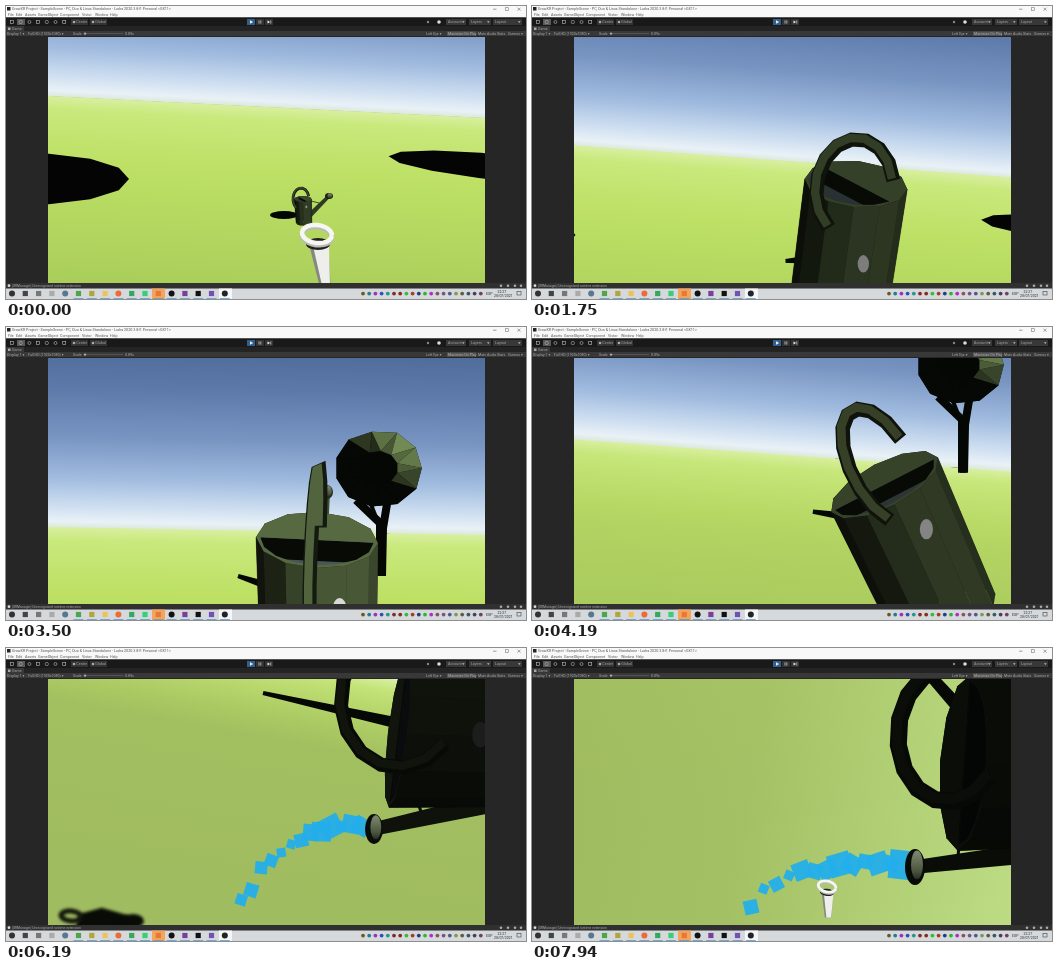
These frames come from a looping animation (520 by 293 pixels, 8 s). An HTML page with a canvas:

```html
<!DOCTYPE html>
<html lang="en">
<head>
<meta charset="utf-8">
<title>Watering can</title>
<style>
html, body { margin: 0; width: 100%; height: 100%; overflow: hidden; background: #262627; }
svg, canvas { position: absolute; left: 0; top: 0; }
canvas { left: 42px; top: 31px; }
text { font-family: Roboto, Arial, sans-serif; }
</style>
</head>
<body>
<svg id="ui" width="520" height="293"></svg>
<canvas id="view" width="437" height="246"></canvas>
<script>
const ui = document.getElementById('ui');
const g = document.getElementById('view').getContext('2d');
const LOOP = 8000, STEP = 62.5, TAU = Math.PI * 2;
const rand = n => { const s = Math.sin(n * 127.1 + 3.7) * 43758.5453; return s - Math.floor(s); };

// ---- editor window ----
function add(tag, attrs, text) {
  const e = document.createElementNS('http://www.w3.org/2000/svg', tag);
  for (const k in attrs) e.setAttribute(k, attrs[k]);
  if (text) e.textContent = text;
  ui.append(e);
}
const rect = (x, y, width, height, fill) => add('rect', { x, y, width, height, fill });
const box = (x, y, width, height, stroke, rx = 0) =>
  add('rect', { x, y, width, height, rx, stroke, fill: 'none', 'stroke-width': .6 });
const dot = (cx, cy, r, fill) => add('circle', { cx, cy, r, fill });
const line = (d, stroke) => add('path', { d, stroke, fill: 'none', 'stroke-width': .7 });
const label = (x, y, text, fill = '#a8a8a8', size = 3.7) =>
  add('text', { x, y, fill, 'font-size': size }, text);

rect(0, 0, 520, 11.5, '#f8f8f8');
rect(0, 11.5, 520, 8.5, '#191919');
rect(0, 20, 520, 5, '#242424');
rect(0, 25, 520, 5, '#383838');
rect(0, 30, 520, 247, '#262627');
rect(0, 277, 520, 5.5, '#303030');
rect(0, 282.5, 520, 10.5, '#d5d9dc');

rect(1, 1, 3.5, 3.5, '#222');
label(6, 4.4, 'GrowXR Project - SampleScene - PC, Duo & Linux Standalone - Ludra 2020.3.8f1 Personal <GX11>', '#555');
[['File', 2], ['Edit', 10], ['Assets', 19], ['GameObject', 32], ['Component', 54], ['Vistor', 76], ['Window', 89], ['Help', 104]]
  .forEach(([s, x]) => label(x, 10.2, s, '#555'));
line('M487 3.2h3.5M511.5 1.7l3 3m0-3l-3 3', '#777');
box(499.5, 1.7, 2.8, 2.8, '#777');

rect(11, 13, 8, 6, '#595959');
for (let i = 0; i < 7; i++) box(4.5 + i * 8.7, 14.5, 3, 3, '#bbb', i % 3);
[['Center', 65], ['Global', 84]].forEach(([s, x]) => {
  rect(x, 13, 17, 6, '#333');
  dot(x + 3, 16, 1.3, '#aaa');
  label(x + 5.3, 17.3, s);
});
[241, 250, 259].forEach((x, i) => rect(x, 13, 8, 6, i ? '#333' : '#31608f'));
add('path', { d: 'M244 14.2l3.2 1.8-3.2 1.8zM261.5 14.4l2.6 1.6-2.6 1.6z', fill: '#eee' });
line('M253 14.4v3.2m1.8-3.2v3.2M264.8 14.4v3.2', '#ddd');
dot(422, 16, 1.2, '#888');
dot(433, 16, 1.8, '#ddd');
[['Account', 440, 20], ['Layers', 463, 22], ['Layout', 487, 29]].forEach(([s, x, w]) => {
  rect(x, 13, w, 6, '#383838');
  label(x + 2, 17.3, s);
  add('path', { d: `M${x + w - 4} 15.3h2.6l-1.3 1.6z`, fill: '#bbb' });
});
rect(0, 20, 18, 5, '#383838');
rect(2, 21.5, 2.5, 2.5, '#aaa');
label(6, 24, 'Game');
rect(78, 27.3, 39, .6, '#666');
dot(79, 27.6, 1.2, '#aaa');
rect(441, 25.5, 29, 4.2, '#555');
[['Display 1  ▾', 1], ['Full HD (1920x1080)  ▾', 22], ['Scale', 67], ['0.89x', 119], ['Left Eye  ▾', 420],
  ['Maximize On Play', 442], ['Mute Audio', 472], ['Stats', 491], ['Gizmos ▾', 502]].forEach(([s, x]) => label(x, 29, s, '#aaa', 3.6));
dot(3, 279.7, 1.4, '#ddd');
label(6, 281, '[XRManager] Unrecognized runtime extension', '#aaa', 3.4);
[495, 502, 509, 515].forEach(x => dot(x, 279.7, 1.3, '#aaa'));

// ---- taskbar ----
rect(146, 282.5, 13, 10.5, '#f4a45c');
rect(213, 282.5, 13, 10.5, '#f4f6f7');
'#333 #444 #777 #aaa #587891 #4fa64a #b2a63a #eac35b #ee6a36 #35a85d #38cf78 #e87935 #111 #79409a #111 #7450b4 #20242a'
  .split(' ').forEach((c, i) => {
    const x = 6 + i * 13.3;
    if (i > 4) rect(x - 5, 292.2, 10, .8, '#5a9bd0');
    if (i % 4) rect(x - 2.6, 284.9, 5.2, 5.2, c); else dot(x, 287.5, 3, c);
  });
for (let i = 0; i < 20; i++)
  dot(357 + i * 6.2, 287.6, 1.9, `hsl(${360 * rand(i)} ${i < 12 ? 60 : 25}% ${25 + 25 * rand(i + 50)}%)`);
label(480, 289, 'ESP', '#333');
label(491.5, 286.8, '22:27', '#333', 3.5);
label(488, 291.4, '28/07/2021', '#333', 3.5);
box(511, 285.5, 4, 3.5, '#444');

// ---- drawing helpers ----
// Each key is [time, ...values]; values ease from one key to the next.
function at(t, ...keys) {
  let i = keys.findIndex(k => k[0] > t);
  if (i < 0) return keys[keys.length - 1].slice(1);
  if (!i) return keys[0].slice(1);
  const a = keys[i - 1], b = keys[i];
  let u = (t - a[0]) / (b[0] - a[0]);
  u = u * u * (3 - 2 * u);
  return a.slice(1).map((v, j) => v + (b[j + 1] - v) * u);
}
const olive = k => `rgb(${6 + 94 * k},${8 + 113 * k},${5 + 69 * k})`;
const lerp = (a, b, u) => a + (b - a) * u;

function trace(pts) { g.beginPath(); pts.forEach(p => g.lineTo(...p)); }
function fill(pts, color) { trace(pts); g.fillStyle = color; g.fill(); }
function stroke(pts, color, width) { trace(pts); g.strokeStyle = color; g.lineWidth = width; g.stroke(); }
function oval(x, y, rx, ry, color, turn = 0) {
  g.beginPath();
  g.ellipse(x, y, rx, ry, turn, 0, TAU);
  g.fillStyle = color;
  g.fill();
}
function tube([x0, y0], [x1, y1], w0, w1, color) {
  const len = Math.hypot(x1 - x0, y1 - y0) || 1;
  const nx = (y0 - y1) / len / 2, ny = (x1 - x0) / len / 2;
  fill([[x0 + nx * w0, y0 + ny * w0], [x1 + nx * w1, y1 + ny * w1],
    [x1 - nx * w1, y1 - ny * w1], [x0 - nx * w0, y0 - ny * w0]], color);
}
function onOval([x, y, rx, ry, turn = 0], a) {
  const u = Math.cos(a) * rx, v = Math.sin(a) * ry, c = Math.cos(turn), s = Math.sin(turn);
  return [x + u * c - v * s, y + u * s + v * c];
}
const arc = (shape, from, to, n) =>
  Array.from({ length: n + 1 }, (_, i) => onOval(shape, lerp(from, to, i / n)));
function at2d([dx, dy, scale = 1, turn = 0], paint) {
  g.save();
  g.translate(dx, dy);
  g.rotate(turn);
  g.scale(scale, scale);
  paint();
  g.restore();
}
function ramp(x0, y0, x1, y1, stops) {
  const r = g.createLinearGradient(x0, y0, x1, y1);
  stops.forEach(([o, c]) => r.addColorStop(o, c));
  return r;
}

// ---- landscape ----
const sky = ramp(0, -200, 0, 0, [[0, '#4a6593'], [.3, '#5c79a9'], [.55, '#7895c2'], [.75, '#a0bbdf'], [.9, '#d0e0f1'], [.97, '#e9f1f7'], [1, '#dbe9dc']]);
const grass = ramp(0, 0, 0, 320, [[0, '#d8efa0'], [.04, '#c9e97c'], [.2, '#bde065'], [.55, '#abcf5b'], [.8, '#a2c05f'], [1, '#a1bc62']]);
const dull = ramp(0, 0, 0, 320, [[0, 'rgba(160,188,96,0)'], [.25, 'rgba(160,188,96,.9)'], [1, 'rgba(160,188,96,1)']]);
const glow = ramp(41, 120, 478, 200, [[0, 'rgba(204,236,150,0)'], [.4, 'rgba(204,236,150,.1)'], [1, 'rgba(204,236,150,.7)']]);

function landscape(t) {
  const [yl, yr] = at(t, [0, 90, 112], [1062.5, 92, 111], [2437.5, 187, 232], [3500, 200, 208],
    [5062.5, -14, 53], [6187.5, -30, 48], [7937.5, -90, -40]);
  at2d([41, yl, 1, Math.atan2(yr - yl, 437)], () => {
    g.fillStyle = sky; g.fillRect(-300, -700, 1200, 700);
    g.fillStyle = grass; g.fillRect(-300, 0, 1200, 800);
    g.globalAlpha = at(t, [3500, 0], [5062.5, .8], [6187.5, 1])[0];
    g.fillStyle = dull; g.fillRect(-300, 0, 1200, 800);
  });
  g.save();
  g.globalAlpha = at(t, [6187.5, 0], [7937.5, .9])[0];
  g.fillStyle = glow; g.fillRect(41, 30, 438, 248);
  g.restore();

  // tree shadows on the grass
  const left = at(t, [0, 20, 173], [1062.5, 11, 175], [2437.5, -130, 283], [3500, -130, 233], [5062.5, -35, 87], [6187.5, -130, 20]);
  fill(arc([...left, 103, 26], 0, TAU, 14), '#030403');
  const right = at(t, [0, 500, 162], [1062.5, 493, 161], [2437.5, 640, 290]);
  fill(arc([...right, 118, 13, .1], 0, TAU, 14), '#030403');
}

function tree(t) {
  if (t < 2437 || t > 5000) return;
  at2d(at(t, [2437.5, 542, 156], [3500, 372, 141], [5000, 500, -95]), () => {
    const dark = '#050704', n = 11;
    stroke([[2, 108], [2, 55], [-22, 32]], dark, 8);
    stroke([[4, 108], [5, 60], [10, 30]], dark, 8);
    stroke([[3, 62], [-8, 34]], dark, 4);
    const ring = (scale, a) => onOval([0, 0, 45 * scale, 38 * scale], a);
    const edge = i => ring(.96 + .1 * rand(i % n), i / n * TAU);
    fill(Array.from({ length: n }, (_, i) => edge(i)), dark);
    for (let i = 0; i < n; i++) {
      const a = (i + .5) / n * TAU, lit = Math.max(0, Math.cos(a + .8));
      fill([edge(i), edge(i + 1), ring(.45, a)], olive(lit * 1.15));
      fill([edge(i + 1), ring(.45, a), ring(.45, a + TAU / n)], olive(lit * .85));
    }
  });
}

// ---- watering can: a few key poses, eased between ----
// rim: x y rx ry turn | base: x y | handle: x y rx ry width | spout: x y width | rose: x y rx ry | grip: x y | tone: light, spin of opening
const poses = [
  { t: 562.5, rim: [297, 193, 8.5, 3, 0], base: [298, 217], handle: [295, 193, 8, 11, 2.8], spout: [304, 209, 4.5], rose: [323, 190, 4, 3], grip: [297, 205], tone: [.6, 1] },
  { t: 1062.5, rim: [303, 196, 46, 18, 0], base: [300, 420], handle: [288, 206, 45, 60, 11], spout: [337, 255, 20], rose: [398, 188, 13, 8], grip: [300, 260], tone: [1, 1] },
  { t: 2437.5, rim: [345, 160, 57, 28, .2], base: [280, 420], handle: [358, 160, 32, 40, 17], spout: [286, 215, 14], rose: [272, 172, 8, 8], grip: [207, 250], tone: [.04, .5] },
  { t: 3500, rim: [311, 213, 61, 28, .05], base: [313, 420], handle: [309, 219, 4, 76, 14], spout: [318, 200, 8], rose: [321, 165, 6, 7], grip: [232, 249], tone: [.9, 0] },
  { t: 5062.5, rim: [412, 78, 58, 14, -1.23], base: [560, 110], handle: [408, 25, 68, 44, 15], spout: [490, 163, 18], rose: [364, 168, 9, 15], grip: [351, 92], tone: [.05, 0] },
  { t: 6187.5, rim: [392, 85, 75, 10, -1.45], base: [560, 90], handle: [395, 50, 70, 60, 14], spout: [490, 154, 18], rose: [368, 181, 9, 15], grip: [257, 45], tone: [.12, 0] },
  { t: 7937.5, rim: [432, 115, 88, 24, -1.5], base: [580, 115], handle: [418, 86, 68, 52, 17], spout: [490, 206, 18], rose: [383, 219, 10, 18], grip: [320, -60], tone: [.05, 0] }
];
const part = (name, t) => at(t, ...poses.map(p => [p.t, ...p[name]]));

function can(t) {
  const [rim, base, handle, spout, rose, grip, tone] =
    ['rim', 'base', 'handle', 'spout', 'rose', 'grip', 'tone'].map(n => part(n, t));
  const [light, spin] = tone, [x, y, rx, ry, turn] = rim, width = handle[4];
  const axis = u => [lerp(x, base[0], u), lerp(y, base[1], u)];

  tube(grip, axis(.3), width * .3, width, olive(0));
  stroke([[x, y], [lerp(spout[0], rose[0], .6), lerp(spout[1], rose[1], .6)]], olive(.3 * light), spout[2] * .17);
  tube(spout, rose, spout[2] * 1.1, spout[2] * .75, olive(.72 * light));
  oval(...rose, olive(.35 * light));
  oval(rose[0] + rose[2] * .2, rose[1] - rose[3] * .12, rose[2] * .6, rose[3] * .8,
    ramp(0, rose[1] - rose[3], 0, rose[1] + rose[3], [[0, '#858d75'], [.6, '#4c5740'], [1, '#10140d']]));

  // body: far side first, then the near side
  const foot = [...base, rx * .92, ry * .92, turn], sides = 12;
  for (let i = sides / 2; i < sides * 1.5; i++) {
    const a = i / sides * TAU, b = a + TAU / sides;
    const shade = olive(light * (.12 + .68 * Math.max(0, Math.cos((a + b) / 2 - 1))));
    const face = [onOval(rim, a), onOval(rim, b), onOval(foot, b), onOval(foot, a)];
    fill(face, shade);
    stroke([face[1], face[2]], shade, .5);
  }
  const [hx, hy] = axis(.33), white = 240 * light;
  oval(hx + rx * .36, hy, rx * .11, rx * .17, `rgb(${white},${white},${white})`);

  // top with its half opening and the wall inside
  fill(arc(rim, 0, TAU, sides), olive(.95 * light));
  const mouth = arc([x, y, rx * .93, ry * .9, turn], spin, spin + Math.PI, 8);
  fill(mouth, `rgb(${80 * light},${95 * light},${98 * light})`);
  g.save();
  trace(mouth);
  g.clip();
  const [p, q] = [mouth[0], mouth[8]], drop = ry * .75;
  fill([p, q, [q[0], q[1] + drop], [p[0], p[1] + drop]], olive(.02));
  g.restore();

  const loop = arc([...handle.slice(0, 4), turn], -.25, -4.1, 10);
  stroke(loop, olive(.18 * light), width);
  at2d([-width * .1, -width * .12], () => stroke(loop, olive(.9 * light), width * .6));
}

function canShadow(t) {
  const fade = at(t, [562.5, 1], [875, 0])[0];
  if (fade) oval(278, 209, 14, 4, `rgba(4,6,3,${fade})`);
  if (t < 4200) return;
  g.save();
  g.filter = 'blur(1.8px)';
  at2d(at(t, [4200, 60, 60], [5062.5, 0, 0], [6187.5, -47, 26], [7400, -140, 65]), () => {
    fill(arc([152, 262, 39, 26, .4], 0, TAU, 9), '#090b06');
    stroke(arc([112, 242, 10, 5, .1], 0, TAU, 16), '#10140b', 5);
    oval(174, 247, 11, 7, '#090b06');
  });
  g.restore();
}

// ---- water: square drops leave the rose and fall along an arc ----
const LIFE = 1000, GAP = 77, POUR = 4350;
function water(t) {
  if (t < POUR) return;
  const [reach, rise, fallBy, big] = at(t, [5062.5, 165, 61, 126, 21], [6187.5, 130, 42, 112, 21], [7937.5, 165, 40, 76, 27]);
  const [x, y] = part('rose', t);
  g.fillStyle = 'rgba(35,174,235,.94)';
  for (let i = Math.max(0, Math.ceil((t - POUR - LIFE) / GAP)); i * GAP <= t - POUR; i++) {
    const u = (t - POUR - i * GAP) / LIFE;
    const size = big * (.5 + .65 * rand(i)) * (1.05 - .55 * u);
    const spread = 16 * u * (rand(i + 200) - .5);
    at2d([x - 4 - reach * u, y - rise * u + fallBy * u * u + spread, 1, (rand(i + 400) - .5) * 1.1],
      () => g.fillRect(-size / 2, -size / 2, size, size));
  }
}

function controller(t) {
  if (t > 625 && t < 7400) return;
  const pose = t < 1000 ? at(t, [0, 311, 229, 1, 0], [562.5, 299, 207, 1, 0])
    : at(t, [7400, 307, 290, .6, .12], [7937.5, 295, 239, .6, .12]);
  at2d(pose, () => {
    tube([2, 10], [8, 50], 19, 11, '#858781');
    tube([4, 10], [9, 50], 16, 8, '#eeeeeb');
    oval(1, 9, 12, 6, '#1e211f');
    oval(-2, 8, 2, 1.4, '#555');
    stroke(arc([0, 1, 15, 9, .12], 0, TAU, 24), '#b9bcb5', 5);
    stroke(arc([0, -1, 15, 9, .12], 0, TAU, 24), '#f6f6f3', 4.5);
  });
}

function draw(t) {
  g.setTransform(1, 0, 0, 1, -42, -31);
  landscape(t);
  tree(t);
  canShadow(t);
  water(t);
  can(t);
  controller(t);
}

const start = performance.now();
function tick() {
  const t = (performance.now() - start) % LOOP;
  draw(Math.floor(t / STEP) * STEP);
  requestAnimationFrame(tick);
}
tick();
</script>
</body>
</html>
```
